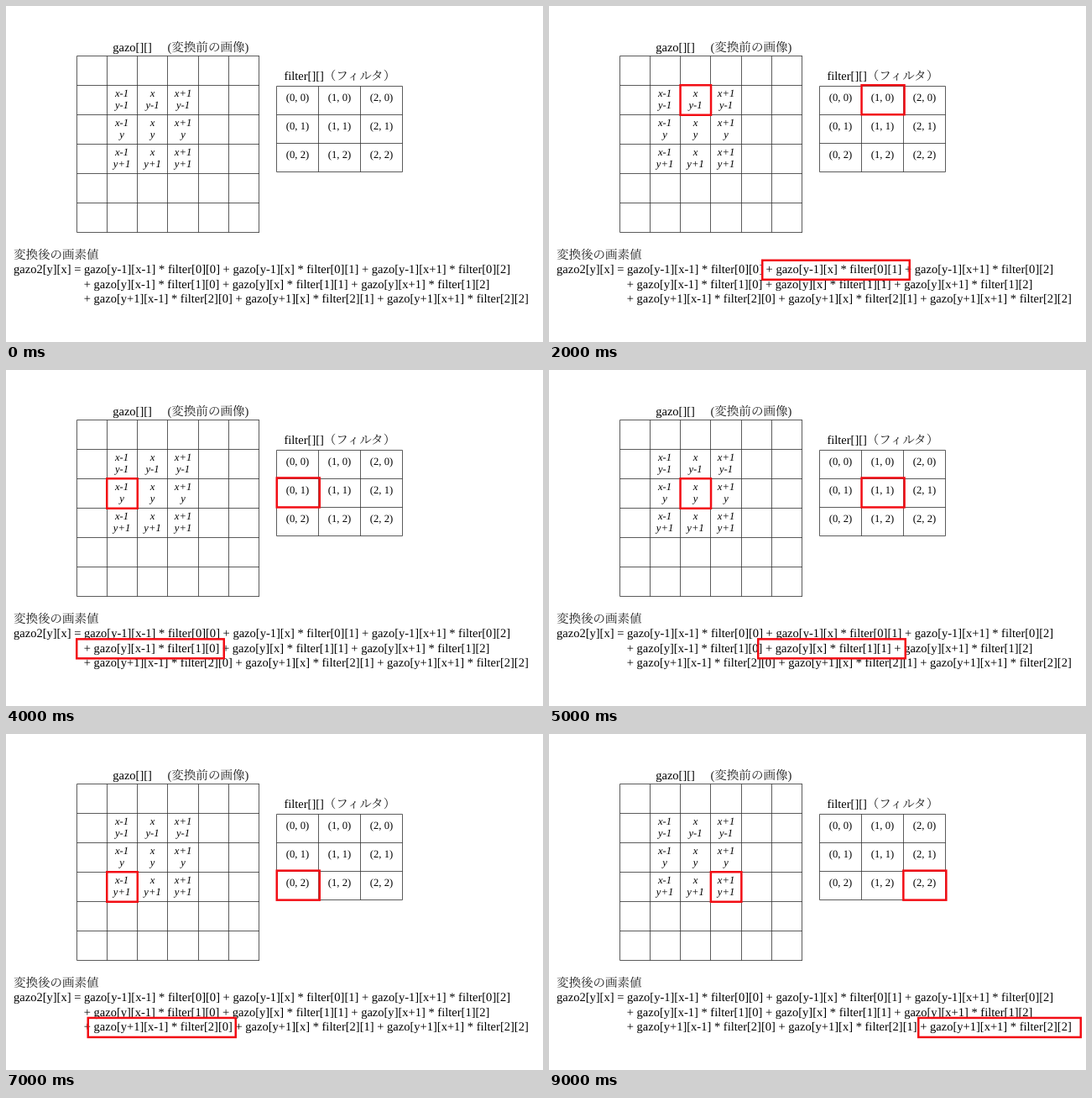
Write an HTML page that moves like this. It is 640 px wide and 400 px high and loops after 10000 ms.

```html
<!DOCTYPE html>
<html lang="ja">
<head>
<meta charset="utf-8">
<style>
  html, body { margin: 0; width: 100%; height: 100%; overflow: hidden; background: #fff; }
  svg { display: block; width: 640px; height: 400px; }
  text { font: 14.53px "Liberation Serif", "Noto Serif CJK JP", "Noto Sans CJK JP", "Noto Sans CJK", serif; white-space: pre; text-rendering: geometricPrecision; }
  .ja { font-weight: 300; fill: #222; }
  .cell { font-size: 12.6px; text-anchor: middle; }
  .it { font-style: italic; }
  .grid { fill: none; stroke: #333; stroke-width: 0.8; }
  .mark rect { fill: none; stroke: #f20d14; stroke-width: 2.5; }
</style>
</head>
<body>
<svg id="stage" viewBox="0 0 640 400"></svg>
<script>
const stage = document.getElementById('stage');

function add(tag, attrs, parent = stage, content = '') {
  const el = document.createElementNS('http://www.w3.org/2000/svg', tag);
  for (const key in attrs) el.setAttribute(key, attrs[key]);
  el.textContent = content;
  parent.appendChild(el);
  return el;
}

const label = (x, y, content, cls = '') => add('text', { x, y, class: cls }, stage, content);

function grid(x, y, w, h, n) {
  let d = '';
  for (let i = 0; i <= n; i++) {
    const gx = Math.floor(x + i * w / n) + 0.5;
    const gy = Math.floor(y + i * h / n) + 0.5;
    d += `M${gx} ${y + 0.5}v${h}M${x + 0.5} ${gy}h${w}`;
  }
  add('path', { d, class: 'grid' });
}

grid(84, 59, 217.5, 210, 6);
grid(322, 95, 150, 102, 3);

label(127.2, 54, 'gazo[][]');
label(192.5, 54, '(変換前の画像)', 'ja');
label(331.4, 88, 'filter[][]');
label(378.8, 88, '（フィルタ）', 'ja');
label(9, 301, '変換後の画素値', 'ja');

const offset = ['-1', '', '+1'];
const term = (r, c) => `gazo[y${offset[r]}][x${offset[c]}] * filter[${r}][${c}]`;

for (let r = 0; r < 3; r++) {
  const terms = [0, 1, 2].map(c => term(r, c)).join(' + ');
  label(r ? 92.7 : 9, 318 + r * 17.6, (r ? '+ ' : 'gazo2[y][x] = ') + terms);
  for (let c = 0; c < 3; c++) {
    const x = 138 + c * 36.5, y = 108 + r * 35;
    label(x, y, 'x' + offset[c], 'cell it');
    label(x, y + 14.2, 'y' + offset[r], 'cell it');
    label(347.5 + c * 50, 113 + r * 34, `(${c}, ${r})`, 'cell');
  }
}

const mark = add('g', { class: 'mark' });
const [pixelBox, filterBox, termBox] = [0, 1, 2].map(() => add('rect', {}, mark));

// Left and right edges of the marked part of the formula
const spans = [
  [86, 264], [253, 431], [432.5, 611],
  [83, 261], [248, 426], [409, 587],
  [96.5, 275], [274, 452], [439, 635]
];

function place(box, x, y, w, h) {
  const attrs = { x: x + 1.25, y: y + 1.25, width: w - 2.5, height: h - 2.5 };
  for (const key in attrs) box.setAttribute(key, attrs[key]);
}

function draw(t) {
  const step = Math.floor(t % 10000 / 1000);
  mark.setAttribute('visibility', step ? 'visible' : 'hidden');
  if (!step) return;
  const i = step - 1, c = i % 3, r = (i - c) / 3;
  const [left, right] = spans[i];
  place(pixelBox, 119 + c * 36.3, 93 + r * 35, 39, 38);
  place(filterBox, 321.5 + c * 49.8, 93 + r * 34.2, 53.5, 37.5);
  place(termBox, left, 301.5 + r * 17.6, right - left, 25.5);
}

const start = performance.now();
function tick() {
  draw(performance.now() - start);
  requestAnimationFrame(tick);
}
draw(0);
requestAnimationFrame(tick);
</script>
</body>
</html>
```
